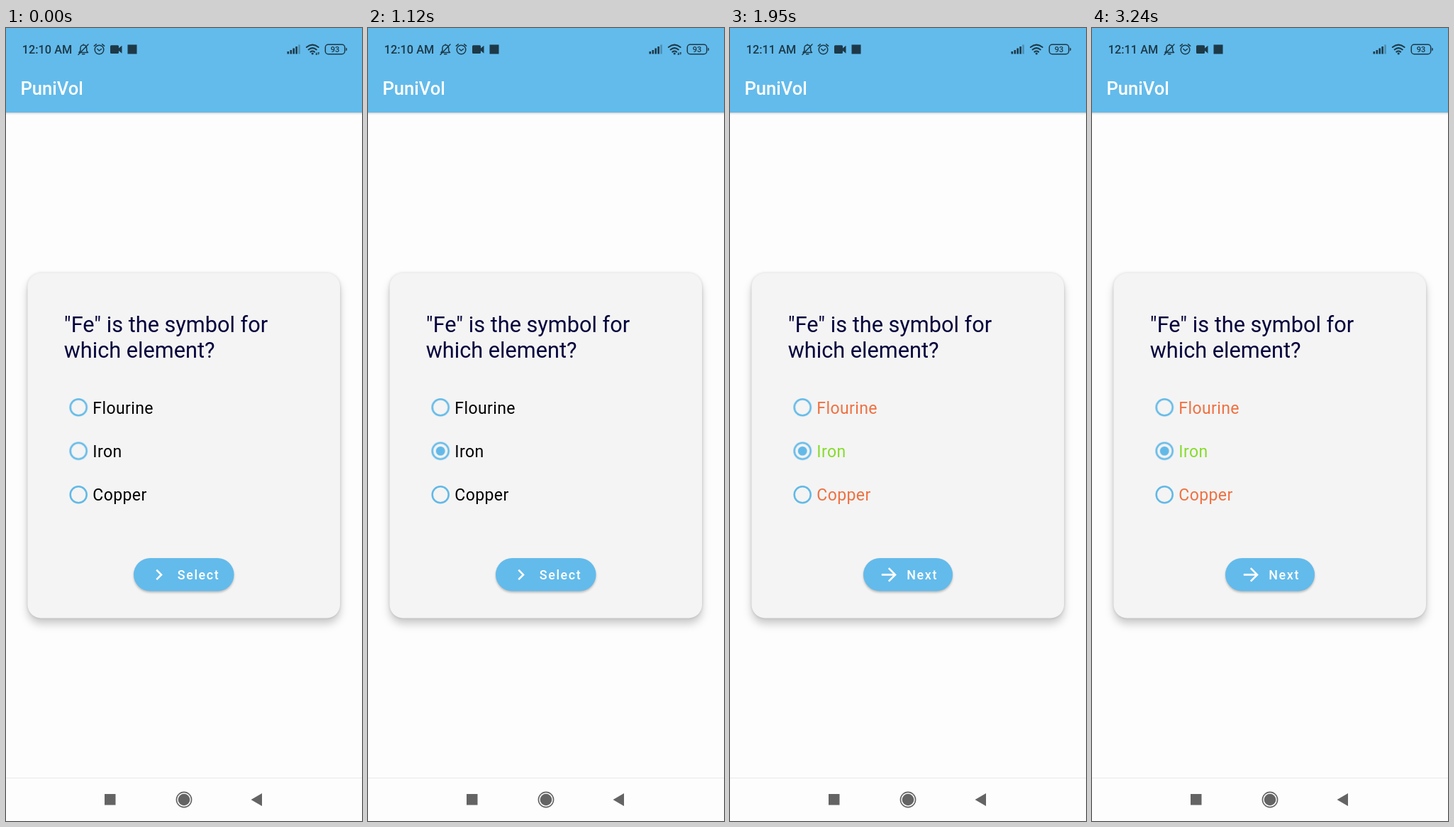
Write an HTML page that moves like this. It is 502 by 1116 pixels and loops after 3.28 s.

```html
<!DOCTYPE html>
<html lang="en">
<head>
<meta charset="utf-8">
<title>Quiz card</title>
<style>
  html, body { margin: 0; width: 100%; height: 100%; overflow: hidden; background: #fdfdfd; }
  svg { display: block; width: 100%; height: 100%; font-family: Roboto, sans-serif; }

  .bar { fill: #63bbeb; filter: drop-shadow(0 1px 1.5px rgba(0,0,0,.22)); }
  .status { fill: #1d3948; color: #1d3948; font-weight: 500; }
  .line { fill: none; stroke: currentColor; stroke-width: 1.5; stroke-linecap: round; stroke-linejoin: round; }
  .title { font-size: 25.6px; font-weight: 500; fill: #fff; }
  .card { fill: #f4f4f4; filter: drop-shadow(0 0 2px rgba(0,0,0,.14)) drop-shadow(0 8px 6px rgba(0,0,0,.2)); }
  .question { font-size: 30.7px; fill: #04033c; }
  .options { font-size: 23px; letter-spacing: .41px; }
  .ring { fill: none; stroke: #62b9e7; stroke-width: 2; }
  .pill { fill: #63bbeb; filter: drop-shadow(0 2px 1.5px rgba(0,0,0,.24)); }
  .label { font-size: 17.9px; font-weight: 500; letter-spacing: 1.6px; fill: #fff; }
  .icon { fill: none; stroke: #fff; stroke-width: 2.6; }
  .nav { fill: #646464; }

  .ripple, .pick, .dot, .wrong, .right, .before, .after, .early, .late, .traffic {
    animation: 3280ms linear infinite;
  }
  .ripple { animation-name: ripple; }
  .pick { animation-name: pick; }
  .dot { fill: #62b9e7; animation-name: dot; }
  .wrong { animation-name: wrong; }
  .right { animation-name: right; }
  .before { animation-name: before; }
  .after { animation-name: after; }
  .early { animation-name: early; }
  .late { animation-name: late; }
  .traffic { animation-name: traffic; }
  .wrong, .right, .before, .after, .early, .late, .traffic { animation-timing-function: step-end; }

  @keyframes ripple {
    0%, 13.4% { transform: scale(.2); opacity: 0; }
    16% { opacity: 1; }
    20.1% { transform: scale(1); }
    22% { opacity: 1; }
    27.4%, 100% { transform: scale(1); opacity: 0; }
  }
  /* the ring swells shut, then opens around the dot */
  @keyframes pick {
    0%, 17.07% { transform: scale(1); stroke-width: 2; }
    22.26% { transform: scale(.5); stroke-width: 18; }
    27.44% { transform: scale(.9); stroke-width: 2; }
    32.5%, 100% { transform: scale(1); stroke-width: 2; }
  }
  @keyframes dot {
    0%, 22.26% { transform: scale(0); }
    22.4% { transform: scale(1.4); }
    32.5%, 100% { transform: scale(1); }
  }
  @keyframes wrong { 0% { fill: #000; } 38.2%, 100% { fill: #f07040; } }
  @keyframes right { 0% { fill: #000; } 38.2%, 100% { fill: #86dc2c; } }
  @keyframes before { 0% { visibility: visible; } 38.2%, 100% { visibility: hidden; } }
  @keyframes after { 0% { visibility: hidden; } 38.2%, 100% { visibility: visible; } }
  @keyframes early { 0% { visibility: visible; } 50.6%, 100% { visibility: hidden; } }
  @keyframes late { 0% { visibility: hidden; } 50.6%, 100% { visibility: visible; } }
  @keyframes traffic {
    0%, 67% { visibility: visible; }
    50.6%, 87%, 100% { visibility: hidden; }
  }
</style>
</head>
<body>
<svg viewBox="0 0 502 1116">
  <rect width="502" height="1116" fill="#fdfdfd"/>
  <rect class="bar" x="-6" y="-6" width="514" height="125"/>

  <g class="status">
    <g font-size="16.3">
      <text class="early" x="22.8" y="36">12:10 AM</text>
      <text class="late" x="22.8" y="36">12:11 AM</text>
    </g>
    <!-- muted bell -->
    <path class="line" d="M103 34.5h12.5l-1.8-2.4v-3.6c0-6-8.8-6-8.8 0v3.6zM107.6 36.7h3.2M109.2 23v1M102 37.5 116 23"/>
    <!-- alarm -->
    <g class="line">
      <circle cx="131.5" cy="30.5" r="6.3"/>
      <path d="M128.8 29.5l2.7 2.5 3-2.5M124.3 25.3l3-2.5M138.7 25.3l-3-2.5"/>
    </g>
    <!-- camera -->
    <path d="M148.5 24.3h9q1.5 0 1.5 1.5v2.7l4.5-3.8v11l-4.5-3.8v2.7q0 1.5-1.5 1.5h-9q-1.5 0-1.5-1.5v-8.8q0-1.5 1.5-1.5z"/>
    <rect x="171.5" y="23.5" width="13" height="13"/>
    <!-- signal -->
    <path d="M396.5 33h2.6v3.5h-2.6zM400.5 31h2.6v5.5h-2.6zM404.4 28.5h2.6v8h-2.6zM408.3 26h2.6v10.5h-2.6z"/>
    <path opacity=".35" d="M412.2 23.5h2.6v13h-2.6z"/>
    <!-- wifi -->
    <g class="line" stroke-width="2" style="stroke-width:2">
      <path d="M423.8 27q8.4-6.8 16.8 0M426.6 30.4q5.6-4.6 11.2 0M429.3 33.6q2.9-2.2 5.8 0"/>
    </g>
    <circle cx="432.2" cy="36" r="1.6"/>
    <path class="traffic" d="M436.6 36l1.2-2 1.2 2v2h-2.4zM439.6 34h2.2v2l-1.1 2-1.1-2z" opacity=".8"/>
    <!-- battery -->
    <rect class="line" x="450.3" y="23.3" width="27.4" height="13.4" rx="4"/>
    <path d="M479.3 27.8q1.7 0 1.7 2.2t-1.7 2.2z"/>
    <text x="464" y="34" font-size="11" text-anchor="middle">93</text>
  </g>
  <text class="title" x="20.4" y="93.5">PuniVol</text>

  <rect class="card" x="30.5" y="345" width="440.5" height="485.5" rx="19"/>
  <g class="question">
    <text x="81.8" y="428">"Fe" is the symbol for</text>
    <text x="81.8" y="464">which element?</text>
  </g>

  <g transform="translate(102 595.3)"><circle class="ripple" r="25.3" fill="#dbdbdb"/></g>
  <g transform="translate(102.2 533.9) scale(1.28)"><circle class="ring" r="9"/></g>
  <g transform="translate(102.2 595.3) scale(1.28)">
    <circle class="ring pick" r="9"/>
    <circle class="dot" r="5"/>
  </g>
  <g transform="translate(102.2 656.7) scale(1.28)"><circle class="ring" r="9"/></g>
  <g class="options">
    <text class="wrong" x="122.3" y="542.6">Flourine</text>
    <text class="right" x="122.3" y="604">Iron</text>
    <text class="wrong" x="122.3" y="665.4">Copper</text>
  </g>

  <g class="before">
    <rect class="pill" x="180" y="746" width="141.5" height="46.5" rx="23.25"/>
    <path class="icon" d="M212.3 762.7l6.7 6.7-6.7 6.7"/>
    <text class="label" x="241.8" y="776">Select</text>
  </g>
  <g class="after">
    <rect class="pill" x="188" y="746" width="126" height="46.5" rx="23.25"/>
    <path class="icon" d="M213.8 769.4h18.5M223.8 760.2l9.2 9.2-9.2 9.2"/>
    <text class="label" x="249.3" y="776">Next</text>
  </g>

  <rect y="1055" width="502" height="1" fill="#e9e9e9"/>
  <g class="nav">
    <rect x="139" y="1078" width="15.5" height="15.5"/>
    <circle cx="251" cy="1086" r="8.3"/>
    <circle cx="251" cy="1086" r="10.6" fill="none" stroke="#646464" stroke-width="1.6"/>
    <path d="M345.5 1086l15.5-9v18z"/>
  </g>
</svg>
</body>
</html>
```
